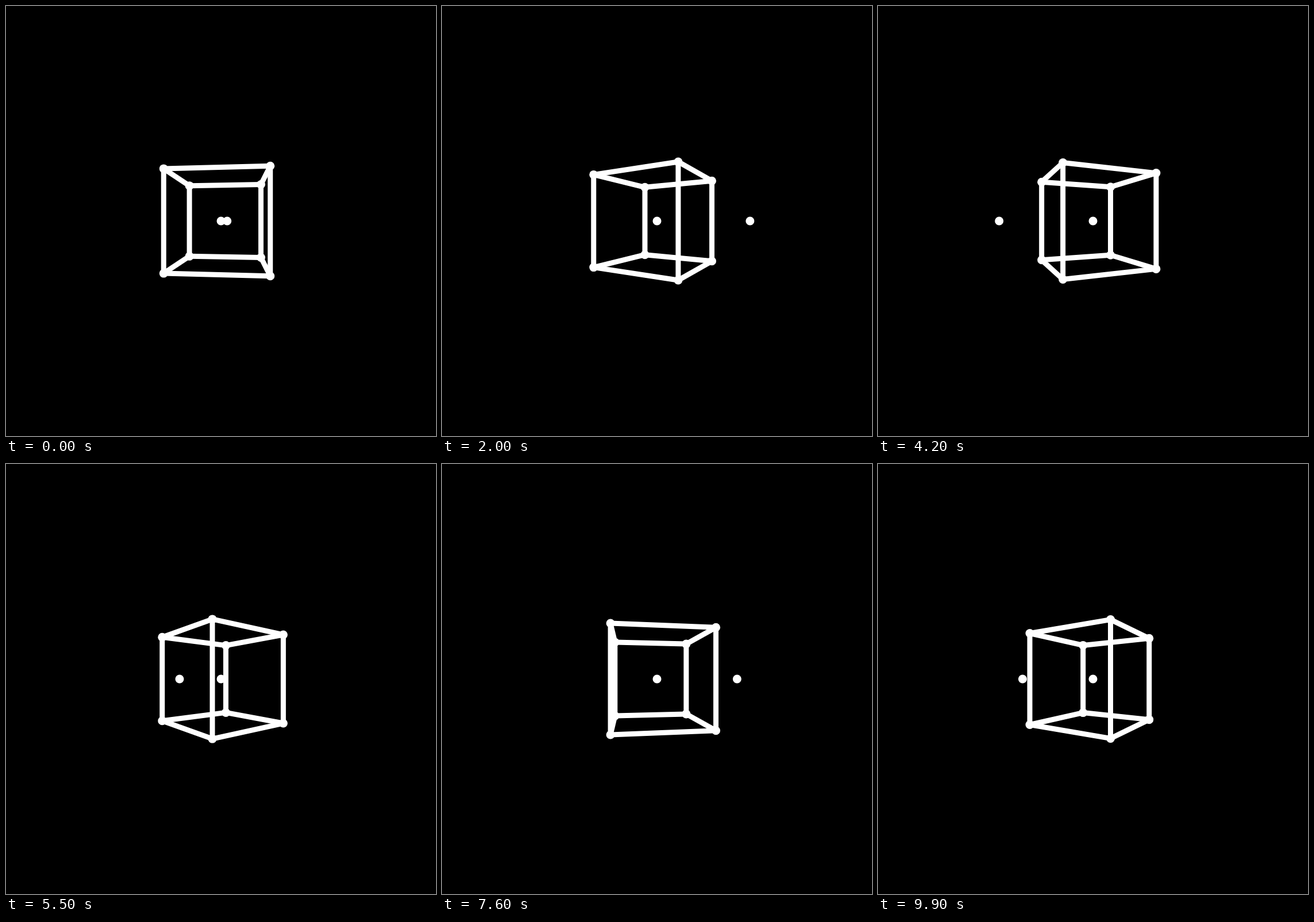
An HTML page with a canvas that plays this animation: 748x748 px, repeating every 10 s.

```html
<!DOCTYPE html>
<html lang="en">
<head>
<meta charset="utf-8">
<title>Rotating cube</title>
<style>
  html, body { margin: 0; height: 100%; overflow: hidden; background: #000; }
  canvas { display: block; }
</style>
</head>
<body>
<canvas id="stage" width="748" height="748"></canvas>
<script>
const ctx = document.getElementById('stage').getContext('2d');
const HALF = 374, DISTANCE = 5, STEP_MS = 100, STEPS = 100;
const corners = [[1, 1], [-1, 1], [-1, -1], [1, -1]];

// Turn a point about the vertical axis, then project it with perspective.
function project(x, y, z, angle) {
  const c = Math.cos(angle), s = Math.sin(angle);
  const scale = HALF / (DISTANCE + z * c - x * s);
  return [HALF + (x * c + z * s) * scale, HALF + y * scale];
}

function dot([x, y]) {
  ctx.beginPath();
  ctx.arc(x, y, 7.5, 0, 2 * Math.PI);
  ctx.fill();
}

function line(a, b) {
  ctx.beginPath();
  ctx.moveTo(...a);
  ctx.lineTo(...b);
  ctx.stroke();
}

function draw(time) {
  const angle = (Math.floor(time / STEP_MS) % STEPS + 1) * 0.1;
  ctx.fillStyle = '#000';
  ctx.fillRect(0, 0, 2 * HALF, 2 * HALF);
  ctx.fillStyle = ctx.strokeStyle = '#fff';
  ctx.lineWidth = 9;

  const [top, bottom] = [-1, 1].map(y => corners.map(([x, z]) => project(x, y, z, angle)));
  for (let i = 0; i < 4; i++) {
    const next = (i + 1) % 4;
    line(top[i], top[next]);
    line(bottom[i], bottom[next]);
    line(top[i], bottom[i]);
  }
  [...top, ...bottom].forEach(dot);

  dot([HALF, HALF]);
  dot(project(0, 0, 2, angle)); // satellite
}

const start = performance.now();
function tick() {
  draw(performance.now() - start);
  requestAnimationFrame(tick);
}
tick();
</script>
</body>
</html>
```
